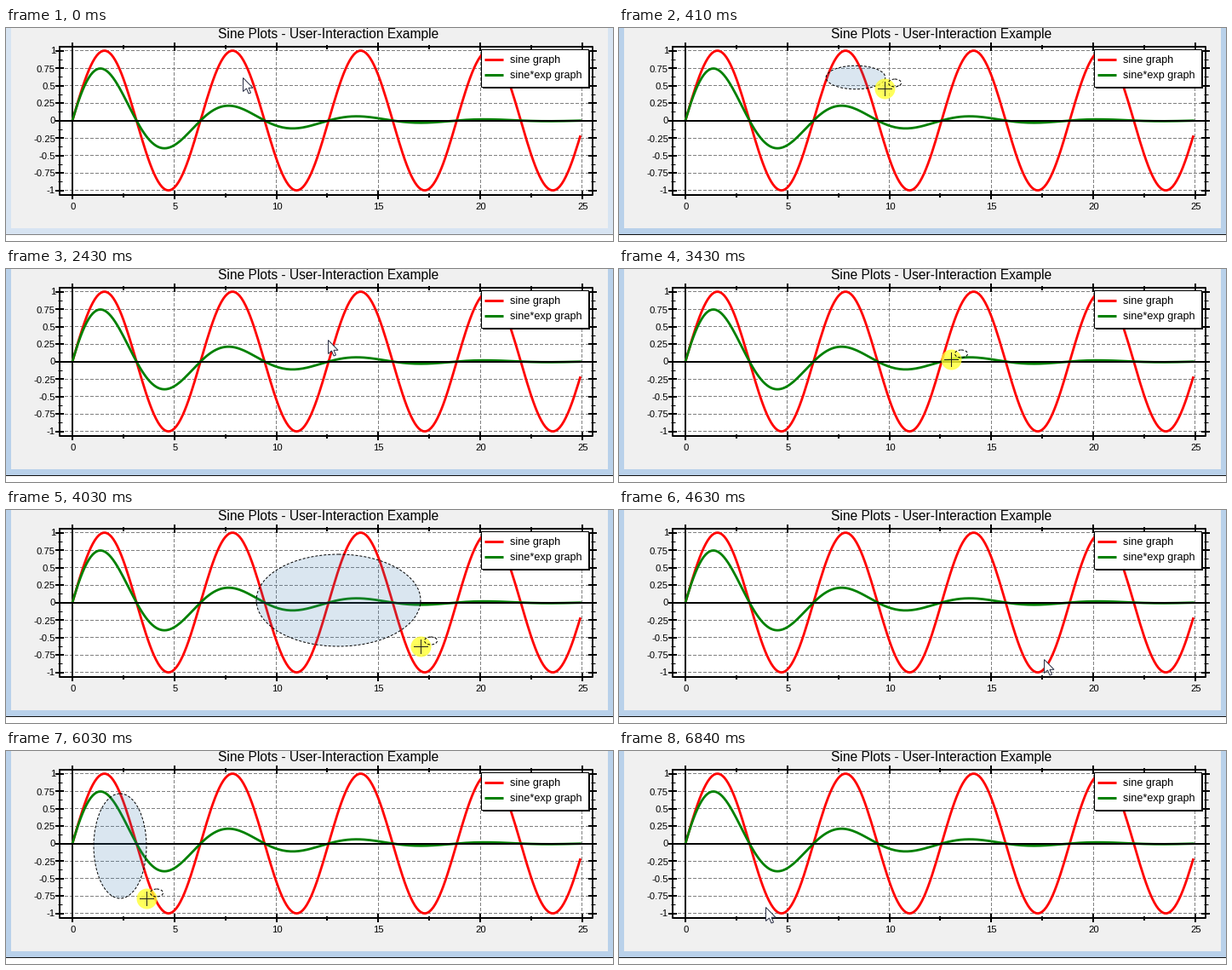
These frames come from a looping animation (713x250 px, 7.04 s). A matplotlib script:

```python
import numpy as np
import matplotlib.pyplot as plt
from matplotlib.animation import FuncAnimation
from matplotlib.patches import Ellipse, Polygon, Rectangle

W, H, DPI = 713, 250, 100
PX = 72 / DPI            # points per pixel
LOOP, STEP = 7040, 20
LEFT, RIGHT, TOP, BOTTOM = 63, 689, 22, 196

# pointer path: time in ms, x, y
PATH = np.array([
    (0, 278, 58), (210, 278, 58), (1010, 369, 94), (1420, 373, 87),
    (2030, 378, 83), (2430, 378, 83), (3030, 390, 113), (3430, 390.5, 106),
    (4030, 487, 160), (4430, 499, 174), (4630, 499, 175),
    (5430, 134, 111.5), (6030, 165, 173), (6440, 172, 183),
])
DRAGS = [(210, 2430), (3430, 4630), (5430, 6840)]   # press, release

# moments at which the screen is refreshed
TICKS = np.array([0, *range(210, 1011, 200), 1420, 2030,
                  *range(2430, 6231, 200), 6440, 6840])

ARROW = np.array([(0, 0), (0, 16), (4, 12.5), (6.5, 18.5),
                  (9, 17.5), (6.5, 11.8), (11.5, 11.8)])

fig = plt.figure(figsize=(W / DPI, H / DPI), dpi=DPI, facecolor="white")
ax = fig.add_axes([0, 0, 1, 1])
ax.set(xlim=(0, W), ylim=(H, 0))
ax.axis("off")


def sx(x):
    return 78 + 23.95 * x


def sy(y):
    return 108.6 - 82 * y


def mid(v):
    """Centre of the pixel that holds v."""
    return int(v) + 0.5


def pointer(t):
    """Position along the path, easing out towards each key point."""
    i = np.searchsorted(PATH[:, 0], t, side="right") - 1
    if i >= len(PATH) - 1:
        return PATH[-1, 1:]
    (t0, *a), (t1, *b) = PATH[i], PATH[i + 1]
    u = np.sin(np.pi / 2 * (t - t0) / (t1 - t0))
    return np.array(a) * (1 - u) + np.array(b) * u


def rect(x, y, w, h, color, z=0):
    return ax.add_patch(Rectangle((x, y), w, h, fc=color, lw=0, zorder=z))


def line(xs, ys, color="black", width=1, z=3, **kw):
    return ax.plot(xs, ys, color=color, lw=width * PX, zorder=z, **kw)[0]


def label(x, y, text, size, ha="center"):
    ax.text(x, y, text, fontsize=size * PX, family="Liberation Sans",
            ha=ha, va="baseline", zorder=6)


def x_tick(x, r):
    for y in (TOP, BOTTOM):
        line([x, x], [y - r, y + r], width=2, solid_capstyle="butt")


def y_tick(y, r):
    for x in (LEFT, RIGHT):
        line([x - r, x + r], [y, y], width=2 if r > 3 else 1,
             solid_capstyle="butt")


def draw_axes():
    dash = dict(color="#808080", z=2, dashes=(4, 2), snap=False)
    for v in np.arange(0, 26, 2.5):
        major = v % 5 == 0
        x_tick(sx(v), 5 if major else 2.5)
        if major:
            line([mid(sx(v))] * 2, [TOP, BOTTOM], **dash)
            label(sx(v) + 0.5, 213, f"{v:g}", 11.3)
    for v in np.arange(-1, 1.01, 0.125):
        major = v % 0.25 == 0
        y_tick(sy(v), 5 if major else 2.5)
        if major:
            line([LEFT, RIGHT], [mid(sy(v))] * 2, **dash)
            label(58, mid(sy(v)) + 4, f"{v:g}", 11.3, "right")
    line([LEFT, RIGHT, RIGHT, LEFT, LEFT],
         [TOP, TOP, BOTTOM, BOTTOM, TOP], width=2)
    line([sx(0)] * 2, [TOP, BOTTOM], width=2)
    label(379, 12, "Sine Plots - User-Interaction Example", 15.5)


def draw_curves():
    x = np.arange(250) * 0.1
    line(sx(x), sy(np.sin(x)), "red", 2.8, 4)
    line(sx(x), sy(np.sin(x) * np.exp(-0.2 * x)), "green", 2.8, 4)
    line([LEFT, RIGHT], [109, 109], width=2, z=4.5)


def draw_legend():
    rect(560, 27, 126, 44, "black", 5)
    ax.add_patch(Rectangle((558.5, 25.5), 126, 44, fc="white", ec="black",
                           lw=PX, zorder=5.1, snap=False))
    for y, color, text in [(37, "red", "sine graph"),
                           (55, "green", "sine*exp graph")]:
        line([562, 584], [y, y], color, 3, 6, solid_capstyle="butt")
        label(592, y + 4, text, 12.6, "left")


border = rect(0, 0, W, 242, "#d7e4f2")
edge = rect(0, 242, W, 1, "#808080")
rect(6, 0, 701, 235, "#f0f0f0", 1)
rect(LEFT, TOP, RIGHT - LEFT, BOTTOM - TOP, "white", 1)
draw_axes()
draw_curves()
draw_legend()


def oval(w, h, z, **kw):
    return ax.add_patch(Ellipse((0, 0), w, h, zorder=z, **kw))


def dashed(on, off):
    return dict(fill=False, ec="black", lw=PX, ls=(0, (on, off)))


fill = oval(1, 1, 7, fc="steelblue", alpha=0.2, lw=0)
outline = oval(1, 1, 7.1, **dashed(3, 2))
glow = oval(24, 24, 8, fc="#ffff32", alpha=0.8, lw=0)
badge = oval(15, 9, 9, **dashed(3, 2))
bar_h = line([], [], "#202020", z=9, snap=False)
bar_v = line([], [], "#202020", z=9, snap=False)
arrow = ax.add_patch(Polygon(ARROW, fc="white", ec="#2a2f45", lw=PX,
                             zorder=9))
drag_parts = [fill, outline, glow, badge, bar_h, bar_v]


def place_drag(centre, pos):
    w, h = 2 * np.abs(pos - centre)
    for part in (fill, outline):
        part.set(center=centre, width=w, height=h, visible=w > 0)
    x, y = mid(pos[0]), mid(pos[1])
    glow.set_center((x, y))
    badge.set_center((x + 11.5, y - 7))
    bar_h.set_data([x - 8, x + 8], [y, y])
    bar_v.set_data([x, x], [y - 8, y + 8])


def update(n):
    now = n * STEP + STEP / 2
    t = TICKS[TICKS <= now][-1]
    active = t > 0
    border.set_facecolor("#b9d1ea" if active else "#d7e4f2")
    edge.set_facecolor("#101010" if active else "#808080")

    pos = pointer(t)
    presses = [press for press, release in DRAGS if press <= t < release]
    arrow.set_visible(not presses)
    arrow.set_xy(ARROW + pos + 0.5)
    for part in drag_parts:
        part.set_visible(bool(presses))
    if presses:
        place_drag(pointer(presses[0]), pos)
    return [border, edge, arrow, *drag_parts]


anim = FuncAnimation(fig, update, frames=LOOP // STEP, interval=STEP,
                     repeat=True, repeat_delay=0, blit=False)
plt.show()
```
